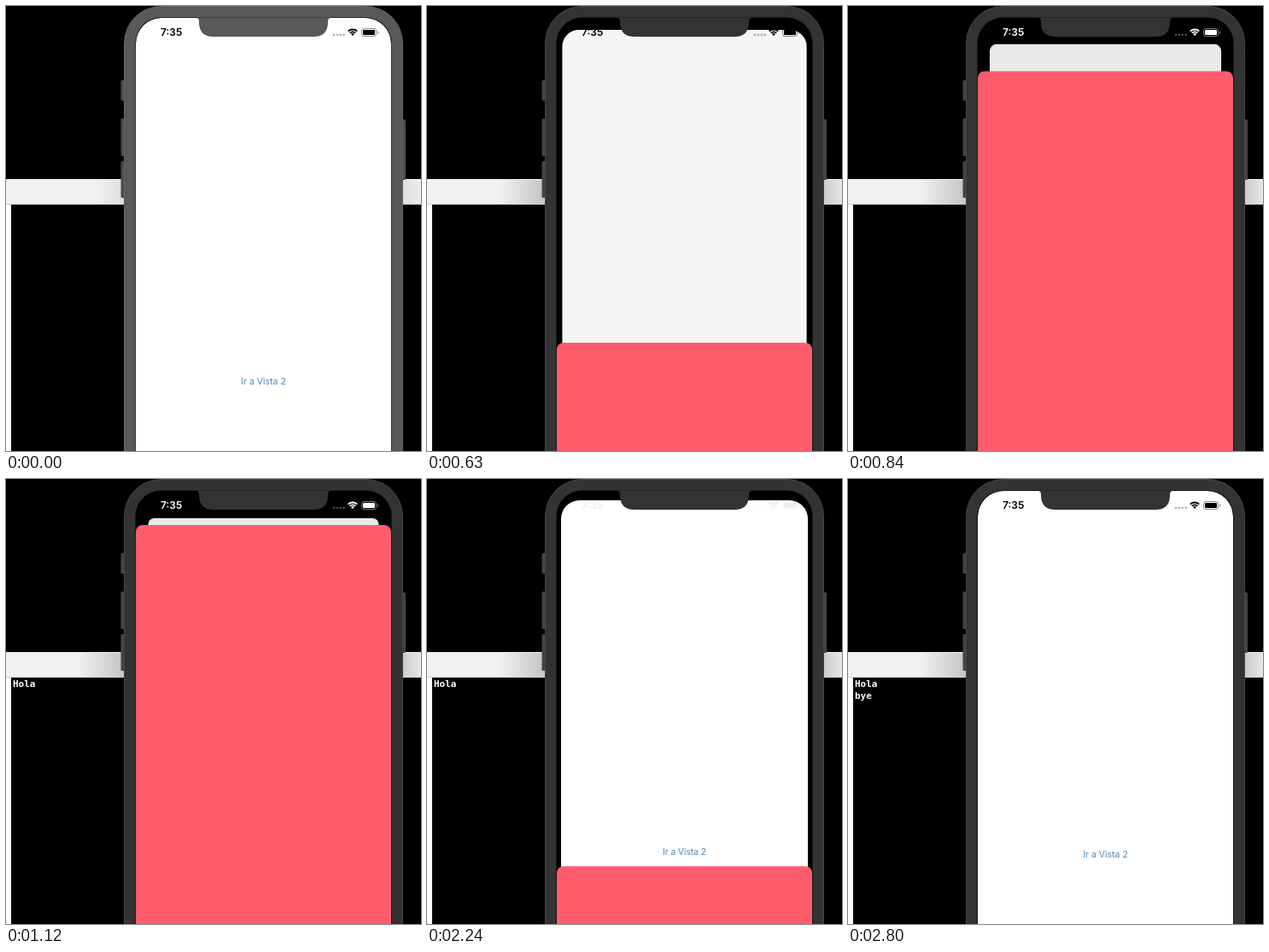
Recreate the animation shown at these times as an HTML page with a canvas. Size 486 by 522 pixels, loop 3.29 s.

```html
<!DOCTYPE html>
<html lang="es">
<head>
<meta charset="utf-8">
<style>
  html, body { margin: 0; width: 100%; height: 100%; overflow: hidden; background: #000; }
  canvas { display: block; width: 486px; height: 522px; }
</style>
</head>
<body>
<canvas id="stage" width="486" height="522"></canvas>
<script>
const ctx = document.getElementById('stage').getContext('2d');

const LOOP = 3290, STEP = 70;
const SCREEN = { x: 152, y: 14, w: 299, h: 650, r: 30 };
const MID = SCREEN.x + SCREEN.w / 2;
const SHEET_TOP = 54, SHEET_TRAVEL = 610, SPRING = 0.0172;
const ACTIVATE = 350, OPEN = 543, HOLA = 1120, DRAG = 2030, RELEASE = 2240, BYE = 2800;

const clamp = v => Math.max(0, Math.min(1, v));
const ramp = (t, from, to) => clamp((t - from) / (to - from));
const lerp = (a, b, k) => a + (b - a) * k;
const gray = v => `rgb(${v},${v},${v})`;

// 0 = sheet hidden, 1 = sheet fully presented
function sheetProgress(t) {
  if (t < OPEN || t >= BYE) return 0;
  if (t < HOLA) {
    const u = (t - OPEN) * SPRING;
    return 1 - (1 + u) * Math.exp(-u);
  }
  if (t <= DRAG) return 1;
  if (t < RELEASE) return 1 - 0.656 * ((t - DRAG) / (RELEASE - DRAG)) ** 2;
  return 0.344 * Math.exp(-(t - RELEASE) * SPRING);
}

function rect(x, y, w, h, color) {
  ctx.fillStyle = color;
  ctx.fillRect(x, y, w, h);
}

function roundRect(x, y, w, h, r, color) {
  ctx.fillStyle = color;
  ctx.beginPath();
  ctx.roundRect(x, y, w, h, r);
  ctx.fill();
}

function text(str, x, y, font, color, align = 'left') {
  ctx.font = font;
  ctx.fillStyle = color;
  ctx.textAlign = align;
  ctx.fillText(str, x, y);
}

function shade(x0, x1, c0, c1) {
  const g = ctx.createLinearGradient(x0, 0, x1, 0);
  g.addColorStop(0, c0);
  g.addColorStop(1, c1);
  rect(Math.min(x0, x1), 204, Math.abs(x1 - x0), 28, g);
}

function drawDesktop(t, active) {
  rect(0, 0, 486, 522, '#000');
  rect(0, 203, 486, 30, '#f1f1f1');
  shade(active ? 84 : 106, 138, '#f1f1f1', active ? '#c4c4c4' : '#dedede');
  shade(486, 465, active ? '#e6e6e6' : '#ededed', active ? '#cccccc' : '#dedede');
  rect(0, 232, 486, 1, '#cfcfcf');
  rect(0, 233, 6, 289, '#fff');
  const mono = 'bold 11px "DejaVu Sans Mono", monospace';
  if (t >= HOLA) text('Hola', 8, 244, mono, '#fff');
  if (t >= BYE) text('bye', 8, 258, mono, '#fff');
}

function drawBody(active) {
  const side = active ? '#444' : '#4c4c4c';
  for (const [y, h] of [[87, 24], [132, 44], [182, 43]]) roundRect(134.5, y, 6, h, 1.5, side);
  roundRect(462, 133, 6, 71, 1.5, side);
  roundRect(138, 0, 327, 720, 44, active ? '#454545' : '#626262');
  roundRect(139, 1, 325, 720, 43, active ? '#333' : '#595959');
  roundRect(SCREEN.x - 0.5, SCREEN.y - 0.5, SCREEN.w + 1, SCREEN.h, SCREEN.r, '#000');
}

function drawCard(t, p) {
  const dim = t < DRAG ? p : clamp((p - 0.4) / 0.6);
  const scale = 1 - 29 / SCREEN.w * p;
  ctx.save();
  ctx.translate(MID, SCREEN.y + 32 * p);
  ctx.scale(scale, scale);
  roundRect(-SCREEN.w / 2, 0, SCREEN.w, SCREEN.h, lerp(SCREEN.r, 8, p),
    gray(Math.round(255 * (1 - 0.09 * dim))));
  ctx.globalAlpha = t >= ACTIVATE && t < 560 ? 0.3 : 1;
  text('Ir a Vista 2', 0, 430, '10.5px Inter, sans-serif', '#4b87b9', 'center');
  ctx.restore();
}

function drawSheet(p) {
  if (p <= 0) return;
  roundRect(SCREEN.x, SHEET_TOP + SHEET_TRAVEL * (1 - p), SCREEN.w, SCREEN.h, 8, '#ff5d6e');
}

function drawNotch(active) {
  ctx.fillStyle = active ? '#333' : '#595959';
  ctx.fill(new Path2D('M222 13.5Q226 14 226 18V19Q226 36 243 36H360Q377 36 377 19V18Q377 14 381 13.5Z'));
}

function drawStatus(t) {
  const light = t < DRAG ? ramp(t, 640, 800) : 1 - ramp(t, 2222, 2480);
  const color = gray(Math.round(255 * light));
  text('7:35', 181, 35, '600 12px Inter, sans-serif', color);

  ctx.fillStyle = ctx.strokeStyle = color;
  ctx.globalAlpha = 0.3;
  for (let i = 0; i < 4; i++) {
    ctx.beginPath();
    ctx.arc(384 + i * 3.9, 33.8, 1.4, 0, 7);
    ctx.fill();
  }

  ctx.globalAlpha = 1;
  const from = -Math.PI * 0.75, to = -Math.PI * 0.25;
  ctx.lineWidth = 1.8;
  for (const r of [7.5, 4.7]) {
    ctx.beginPath();
    ctx.arc(406, 35, r, from, to);
    ctx.stroke();
  }
  ctx.beginPath();
  ctx.moveTo(406, 35);
  ctx.arc(406, 35, 2.9, from, to);
  ctx.fill();

  roundRect(418, 28, 14, 6, 1.2, color);
  ctx.globalAlpha = 0.45;
  ctx.lineWidth = 1;
  ctx.beginPath();
  ctx.roundRect(416.5, 26.5, 17, 9, 2.5);
  ctx.stroke();
  roundRect(435, 29.5, 1.3, 3, 0.6, color);
  ctx.globalAlpha = 1;
}

function draw(t) {
  const active = t >= ACTIVATE;
  const p = sheetProgress(t);
  drawDesktop(t, active);
  drawBody(active);
  ctx.save();
  ctx.beginPath();
  ctx.roundRect(SCREEN.x, SCREEN.y, SCREEN.w, SCREEN.h, SCREEN.r);
  ctx.clip();
  drawCard(t, p);
  drawSheet(p);
  ctx.restore();
  drawNotch(active);
  drawStatus(t);
}

const start = performance.now();
function tick() {
  const t = (performance.now() - start) % LOOP;
  draw(Math.floor(t / STEP) * STEP);
  requestAnimationFrame(tick);
}
tick();
</script>
</body>
</html>
```
